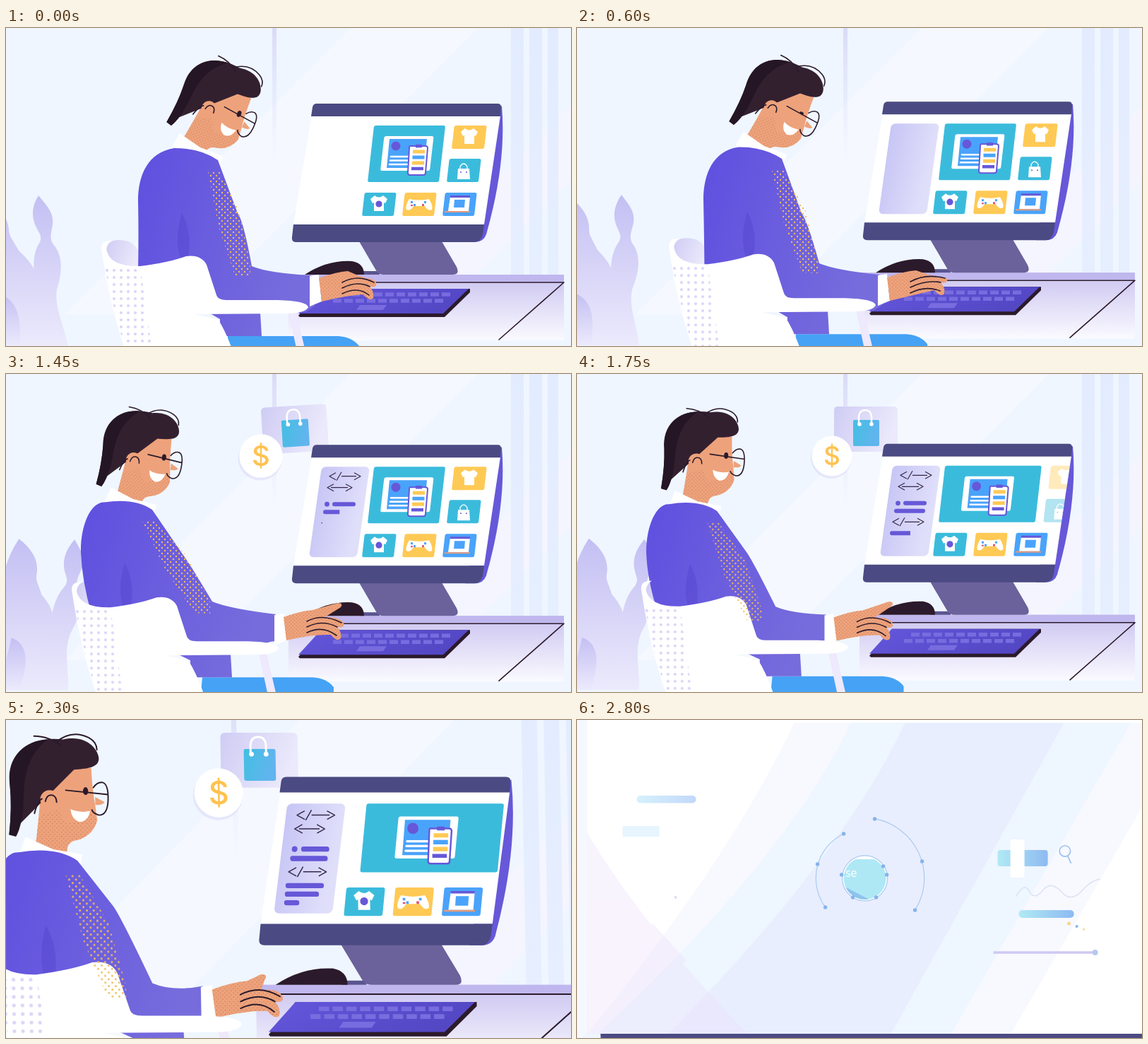
Recreate the animation shown at these times as an HTML page. Size 800 by 450 pixels, loop 2850 ms.

```html
<!DOCTYPE html>
<html lang="en">
<head>
<meta charset="utf-8">
<title>Online shop desk</title>
<style>
  html, body { margin: 0; width: 100%; height: 100%; overflow: hidden; background: #eff6ff; }
  #stage { display: block; width: 100vw; height: 100vh; }
  .line { fill: none; stroke: #2b1a2b; stroke-width: 1.6; stroke-linecap: round; stroke-linejoin: round; }
  .code { fill: none; stroke: #33294a; stroke-width: 1.2; stroke-linejoin: round; }
  .bar { stroke: #6658d8; stroke-width: 6; stroke-linecap: round; }
  .orbit { fill: none; stroke: #a9caf0; stroke-width: 1.2; }
</style>
</head>
<body>
<svg id="stage" viewBox="0 0 800 450">
<defs id="defs">
  <pattern id="skinDots" width="5" height="5" patternUnits="userSpaceOnUse"><path d="M1 1h.8v.8h-.8zM3.5 3.5h.8v.8h-.8z" fill="#a65b3d"/></pattern>
  <pattern id="chairDots" width="10" height="10" patternUnits="userSpaceOnUse"><circle cx="3" cy="3" r="2.1" fill="#dcd5f8"/></pattern>
  <pattern id="goldDots" width="8" height="8" patternUnits="userSpaceOnUse"><circle cx="2" cy="2" r="1.2" fill="#f0bd59"/><circle cx="6" cy="6" r="1.2" fill="#f0bd59"/></pattern>
  <clipPath id="screenClip"><path d="M433 124H700L677 278H407Z"/></clipPath>
  <clipPath id="discClip"><circle cx="408" cy="224" r="30"/></clipPath>
  <path id="shirt" d="M-6-11Q0-6 6-11L12-6 9 0 7-1V11H-7V-1L-9 0-12-6Z" fill="#fff"/>
</defs>
<rect width="800" height="450" fill="#eff6ff"/>
<g id="camera">
  <path d="M488 0H668L263 405H83Z" fill="#f5f9ff"/>
  <path d="M800 110V215L640 375H530Z" fill="#f4f5ff"/>
  <rect x="377" width="6" height="205" fill="url(#post)"/>
  <path d="M715 0h18v350h-18zM741 0h18v350h-18zM767 0h15v350h-15z" fill="url(#blinds)"/>

  <g id="leaves" fill="url(#leaf)">
    <path d="M-33 236C-18 246 2 262 4 285 4 295 10 300 18 315 40 335 46 350 46 368 46 400 30 420 25 450H-60V330Q-40 312-42 290-44 262-33 236Z"/>
    <path d="M-10 376Q18 385 20 425V450H-10Z"/>
    <path d="M46 237C38 250 36 262 40 275 45 290 52 292 48 303 40 315 38 330 40 350 44 385 25 420 22 450H88C82 420 68 395 72 370 80 345 80 325 70 310 60 300 64 290 66 278 68 260 56 250 46 237Z"/>
  </g>

  <g id="bagCard">
    <rect x="-45" y="-32" width="90" height="64" rx="5" fill="url(#card)"/>
    <rect x="-18" y="-13" width="37" height="37" rx="2" fill="url(#bag)"/>
    <path d="M-10-8V-18Q-9-27-1-27T8-18V-8" fill="none" stroke="#fff" stroke-width="2.5"/>
    <circle cx="-9" cy="-7" r="2.8" fill="#fff"/><circle cx="8" cy="-7" r="2.8" fill="#fff"/>
  </g>
  <g id="coin">
    <circle cx="-1" cy="3" r="29" fill="#dcdcf8" opacity=".6"/>
    <circle r="28.5" fill="#fff"/>
    <text y="13" text-anchor="middle" font-family="Inter, sans-serif" font-size="37" font-weight="500" fill="#ffc250">$</text>
  </g>

  <g id="desk">
    <path d="M400 349H790V442H400Z" fill="url(#deskFront)"/>
    <path d="M400 349H790V359H400Z" fill="#bfb7ee"/>
    <path class="line" d="M400 360H790L698 441"/>
    <path d="M500 344h29v5h-29z" fill="#5a5590"/>
    <path d="M500 302H617L638 338Q643 349 633 349H535Q527 349 524 343Z" fill="#6b619b"/>
    <path d="M423 349Q455 328 490 330 507 333 507 349Z" fill="#2b1a2b"/>
    <path d="M702 110Q709 190 680 292 676 303 664 303H650L690 120Z" fill="#6658d8"/>
    <path d="M433 124H700L677 278H407Z" fill="#fff"/>
    <path d="M432 125L434 112Q435 107 440 107H696Q702 107 701 114L700 125Z" fill="#4b4a82"/>
    <path d="M407 278H677L675 292Q672 303 663 303H411Q404 303 405 296Z" fill="#4b4a82"/>
    <g clip-path="url(#screenClip)">
      <g id="sidebar">
        <rect width="68" height="128" rx="6" transform="translate(429 266) skewX(-8) translate(0 -128)" fill="url(#side)"/>
        <g id="rows"></g>
      </g>
      <g id="sideTiles">
        <g class="tile" data-tile="631 171 46 33 #ffc955"/>
        <use href="#shirt" x="656" y="153"/>
        <g class="tile" data-tile="624 218 45 33 #3bbbdc"/>
        <path d="M640 199h16l1 15h-18z" fill="#fff"/>
        <path d="M643 201v-5q5-8 10 0v5" fill="none" stroke="#fff" stroke-width="1.3"/>
        <circle cx="644" cy="204" r="1" fill="#6658d8"/><circle cx="652" cy="204" r="1" fill="#6658d8"/>
      </g>
      <g id="lowTiles">
        <g class="tile" data-tile="504 266 45 33 #3bbbdc"/>
        <use href="#shirt" x="528" y="248"/><circle cx="528" cy="249" r="4.6" fill="#6658d8"/>
        <g class="tile" data-tile="561 266 45 33 #ffc955"/>
        <path transform="translate(585 249)" d="M-14-7Q0-4 14-7 20 3 18 8 13 11 8 3H-8Q-13 11-18 8-20 3-14-7Z" fill="#fff"/>
        <path d="M573 245h3v3h-3zM577 249h3v3h-3zM592 245h3v3h-3z" fill="#4aa3fa"/>
        <path d="M573 250h3v2h-3zM589 249h3v3h-3z" fill="#e0566f"/>
        <g class="tile" data-tile="618 266 45 33 #4aa3fa"/>
        <path d="M629 239h28l-2 20h-29z" fill="#fff"/><path d="M629 237h28v3h-28z" fill="#6658d8"/>
        <path d="M635 243h15l-1 11h-15z" fill="#4aa3fa"/><path d="M621 259h36v2h-36z" fill="#e79a78"/>
      </g>
      <g id="hero">
        <g id="heroTile" class="tile" data-tile="512 218 101 80 #3bbbdc"/>
        <g id="heroArt">
          <g class="tile" data-tile="530 202 70 49 #fff"/>
          <path d="M543 157H596L592 198H539Z" fill="#4aa3fa"/>
          <circle cx="552" cy="167" r="6.5" fill="#6658d8"/>
          <path d="M545 182h26M544 187.5h26M543 193h26" stroke="#fff" stroke-width="2.6" stroke-linecap="round"/>
          <path d="M575 167h19q3 0 3 3l-3 35q0 3-3 3h-19q-3 0-3-3l2-35q0-3 1-3z" fill="#fff" stroke="#6658d8" stroke-width="2"/>
          <path d="M576 175h17M575 191h17" stroke="#ffc955" stroke-width="5"/>
          <path d="M575.5 183h17" stroke="#4aa3fa" stroke-width="5"/>
          <path d="M574 199h17M580 167h9" stroke="#6658d8" stroke-width="4.5"/>
        </g>
      </g>
    </g>
    <path d="M414 407L446 369H657V374L621 409H416Z" fill="#2b1a2b"/>
    <path d="M414 404L446 369H655L619 404Z" fill="url(#keyboard)"/>
    <path d="M473 377H631M463 386H622" stroke="#786cdf" stroke-width="5.5" stroke-dasharray="12 4"/>
    <path d="M501 392h38l-5 7h-38z" fill="#786cdf"/>
  </g>

  <g id="person">
    <path id="chairBack" d="M142 312Q144 300 160 300 180 300 187 315L190 340 160 336Q145 328 142 312Z" fill="url(#card)"/>
    <path id="legs" d="M314 436H470Q490 437 500 450V480H310Z" fill="#45a2f5"/>
    <g id="head">
      <path d="M10-38L50-36Q51-8 54 8L56 25Q50 45 28 49 20 52 20 62L-18 64Q-14 40-10 0Z" fill="#eda27b"/>
      <path d="M52 16L56 25Q50 45 28 49 20 52 20 62L-18 64-12 20 10 12 20 30Z" fill="url(#skinDots)"/>
      <path d="M-47 42Q-43 10-45-15C-50-52-22-74 18-69 45-75 58-58 59-48 60-36 45-35 30-34 22-39Q18-42 20-10 15-3 8-10L-8 10Q-10 30-18 44-35 48-47 42Z" fill="#33202f"/>
      <path d="M-47 42Q-43 10-45-15C-48-50-26-68 0-69-32-45-28-10-30 12Q-33 34-39 44Z" fill="#251625"/>
      <circle cx="1" cy="1" r="11" fill="#eda27b"/>
      <path class="line" d="M-4 3Q-2-6 5-4 9-2 9 4M-16-73Q2-73 16-61M10-66Q28-81 48-71 57-66 57-57M-17 17Q-13 2-8 0"/>
      <path d="M54-2L65 4Q62 8 54 7Z" fill="#eda27b"/>
      <path d="M25 12Q36 17 48 14 45 27 35 27 26 24 25 12Z" fill="#fff"/>
      <ellipse id="eye" cx="43" cy="-9" rx="3" ry="4.5" fill="#2b1a2b"/>
      <path class="line" d="M20-10L69-5M52-13Q57-20 63-19 70-17 69 2 68 19 58 19 51 17 50 13"/>
    </g>
    <path id="collar" d="M-65-20L-54-38-25-18 7-6 0 12-62-8Z" fill="#fff"/>
    <path id="jacket" fill="url(#cloth)"/>
    <path id="fold" d="M249 262Q238 300 247 325L258 323Q264 290 249 262Z" fill="#4938c4" opacity=".3"/>
    <path id="cuff" d="M-2 1L11-1 15 37-2 44Z" fill="#fff"/>
    <path id="hand" fill="#eda27b"/>
    <path id="handDots" fill="url(#skinDots)"/>
    <path id="fingers" class="line"/>
    <g id="chair">
      <path d="M400 402h11l14 60h-12z" fill="#eee9fc"/>
      <path d="M135 312Q135 300 150 301 142 306 142 315 148 338 190 337 230 332 255 323 276 320 284 335L298 378Q300 385 312 385H385Q426 386 428 395 424 404 395 404L266 405 300 412Q312 430 324 465H172Q148 400 135 312Z" fill="#fff"/>
      <path d="M140 338H190L208 465H172Q152 400 140 338Z" fill="url(#chairDots)"/>
    </g>
    <path id="dots" fill="url(#goldDots)"/>
  </g>
</g>

<g id="page">
  <path d="M15-20H840V444H15Z" fill="#fff"/>
  <g id="ribbons"></g>
  <g fill="#eadcfb" opacity=".32">
    <path d="M15 160Q100 300 242 444H15Z"/><path d="M15 275Q90 360 180 444H15Z"/><path d="M15 365Q60 410 97 444H15Z"/>
    <path d="M15 380L108 288 155 340 55 444H15ZM35 444L72 416 105 444Z"/>
  </g>
  <rect x="85" y="107" width="84" height="10.5" rx="5" fill="url(#pill)"/>
  <rect x="65" y="150" width="52" height="15" fill="#e6f5fe"/>
  <circle cx="140" cy="251" r="2" fill="#e3d9f5"/>
  <g class="orbit">
    <path d="M378 161A70 70 0 0 0 352 265M422 140A85 85 0 0 1 479 269"/>
    <circle cx="408" cy="224" r="32" fill="#fff"/>
  </g>
  <g clip-path="url(#discClip)">
    <path d="M370 197H450V260H370Z" fill="#afe8f5"/>
    <path d="M376 234L416 255H376Z" fill="#8fc3ee"/>
    <text x="397" y="222" text-anchor="end" font-family="'Open Sans', sans-serif" font-size="16" fill="#fff">rse</text>
  </g>
  <g id="nodes" fill="#86b4ea"></g>
  <rect x="596" y="184" width="71" height="23" rx="4" fill="url(#button)"/>
  <rect x="614" y="169" width="20" height="54" rx="2" fill="#fff"/>
  <path d="M695 192L700 203M699 185.5a7.7 7.7 0 1 0-15.4 0a7.7 7.7 0 1 0 15.4 0" fill="none" stroke="#9cc0f0" stroke-width="1.7"/>
  <path d="M622 250Q634 228 641 243 648 256 661 240 673 226 690 247 702 257 717 240 728 227 741 225" fill="none" stroke="#dde3f3" stroke-width="1.6"/>
  <rect x="626" y="269" width="78" height="11" rx="5" fill="url(#button)"/>
  <circle cx="697" cy="288" r="2.5" fill="#f8d58a"/><circle cx="708" cy="292" r="2" fill="#86b4ea"/><circle cx="718" cy="296" r="1.5" fill="#f8d58a"/>
  <path d="M590 329H735" stroke="#cfc8f2" stroke-width="3.5"/><circle cx="734" cy="329" r="4" fill="#b7c8ef"/>
</g>
</svg>
<script>
const $ = id => document.getElementById(id);
const set = (id, name, value) => $(id).setAttribute(name, value);
const move = (id, x, y, extra = '') => set(id, 'transform', `translate(${x} ${y}) ${extra}`);

// id, x2, y2, first colour, last colour, last opacity
[
  ['post', 0, 1, '#dadaf6', '#e8ebfd', 0], ['blinds', 0, 1, '#e2ecfe', '#e4edff', .8],
  ['leaf', 0, 1, '#c3bff3', '#eceafc', 1], ['card', 1, .3, '#cfccf4', '#ebe9fb', 1],
  ['bag', 1, .3, '#43bfe2', '#62b4ee', 1], ['deskFront', 0, 1, '#cbc4f0', '#fafaff', 1],
  ['side', 1, .2, '#c7c5f5', '#e0dffa', 1], ['keyboard', 1, .3, '#6557dc', '#5347c4', 1],
  ['cloth', 1, .3, '#5f4fe0', '#776cdc', 1], ['pill', 1, 0, '#d5f1fc', '#c2d8fa', 1],
  ['button', 1, 0, '#b0eaf4', '#8dbaf1', 1]
].forEach(([id, x, y, from, to, alpha]) => $('defs').innerHTML +=
  `<linearGradient id="${id}" x2="${x}" y2="${y}"><stop stop-color="${from}"/><stop offset="1" stop-color="${to}" stop-opacity="${alpha}"/></linearGradient>`);

document.querySelectorAll('.tile').forEach(tile => {
  const [x, y, w, h, fill] = tile.dataset.tile.split(' ');
  tile.innerHTML = `<rect y="${-h}" width="${w}" height="${h}" rx="2.5" fill="${fill}" transform="translate(${x} ${y}) skewX(-6.5)"/>`;
});

const tag = (w, slash) => `<path class="code" d="M10 2L1 7 10 12${slash ? 'M18 1L11 13' : ''}M${slash ? 18 : 6} 7H${w - 7}M${w - 10} 2L${w - 1} 7 ${w - 10} 12"/>`;
const bar = w => `<path class="bar" d="M3 7H${w - 3}"/>`;
// x, y, width, start, end, content
const rows = [
  [457, 151.5, 46, 850, 1150, tag(46, true)], [454, 167.5, 37, 930, 1200, tag(37)],
  [451, 191, 7, 1220, 1270, '<circle cx="3.5" cy="7" r="3.4" fill="#6658d8"/>'],
  [462, 191, 33, 1260, 1400, bar(33)], [449, 202, 44, 1360, 1530, bar(44)],
  [446, 217.5, 46, 1440, 1720, tag(46, true)], [443, 233.5, 45, 1660, 1800, bar(45)],
  [442, 243.5, 40, 1760, 1900, bar(40)], [441, 253.5, 18, 1860, 1960, bar(18)]
];
$('rows').innerHTML = rows.map(([x, y, , , , art]) => `<svg x="${x}" y="${y - 7}" height="14">${art}</svg>`).join('');

$('ribbons').innerHTML = [
  [308, -60, 870, 615, '#f8f9ff'], [388, 30, 785, 530, '#eef6ff'], [465, 130, 690, 445, '#e9eefe']
].map(([a, b, c, d, fill]) => `<path d="M${a} 4Q${a - 90} 195 ${Math.max(b, 15)} 444H${d}L${c} 4Z" fill="${fill}"/>`).join('');
$('nodes').innerHTML = [[378, 161], [341, 204], [352, 265], [422, 140], [489, 200], [479, 269], [434, 207], [439, 219], [375, 219], [391, 251], [424, 251]]
  .map(([x, y]) => `<circle cx="${x}" cy="${y}" r="2.7"/>`).join('');

// Smooth monotone interpolation through [time, value] keys
function track(...keys) {
  const slope = keys.slice(1).map(([t, v], i) => (v - keys[i][1]) / (t - keys[i][0]));
  const tangent = keys.map((_, i) => {
    const a = slope[i - 1], b = slope[i];
    return a * b > 0 ? 2 * a * b / (a + b) : 0;
  });
  return t => {
    if (t <= keys[0][0]) return keys[0][1];
    const j = keys.findIndex(k => k[0] >= t), i = j - 1;
    if (j < 0) return keys.at(-1)[1];
    const [t0, v0] = keys[i], [t1, v1] = keys[j], d = t1 - t0, u = (t - t0) / d;
    return v0 + (v1 - v0) * u * u * (3 - 2 * u) + d * u * (1 - u) * (tangent[i] * (1 - u) - tangent[j] * u);
  };
}
const POSE_TIMES = [0, 600, 1000, 1450, 2050, 2450];
const pose = (...values) => track(...values.map((v, i) => [POSE_TIMES[i], v]));
const clamp = v => Math.min(1, Math.max(0, v));

const tracks = {
  earX: pose(287, 275, 262, 180, 163), earY: pose(113, 112, 111, 121, 123),
  tilt: pose(23, 23, 22, 8, 0),
  back: pose(187, 179, 168, 106, 95),
  neckX: pose(300, 290, 279, 207, 195), neckY: pose(187, 185, 183, 192, 195),
  chestX: pose(328, 318, 325, 250, 235), chestY: pose(262, 262, 255, 255, 247),
  elbowX: pose(348, 343, 370, 292, 277, 281), elbowY: pose(337, 333, 318, 322, 336, 338),
  wristX: pose(432, 428, 454, 382, 338), wristY: pose(350, 349, 347, 340, 341),
  tipX: pose(76, 80, 91, 93, 95, 64), tipY: pose(4, 4, -9, -14, -18, -9),
  knuckleX: pose(86, 90, 88, 90, 87), knuckleY: pose(30, 25, 30, 32, 32),
  dotsX: pose(346, 341, 363, 289, 249), dotsY: pose(335, 331, 314, 323, 340),
  chair: pose(0, -5, -10, -42, -45), legs: pose(0, -4, -8, -36, -38),
  sway: pose(0, .08, .14, .24, .225),
  coinY: track([950, 138], [1000, 131], [1200, 113], [1450, 116]),
  coinSize: track([950, .55], [1000, .7], [1250, 1.14], [1450, 1.08], [1700, 1]),
  coinAlpha: track([950, 0], [1000, .3], [1120, 1]),
  bagSize: track([1120, 0], [1330, 1.08], [1450, 1.03], [1700, 1]),
  bagTurn: track([1120, -22], [1450, -3.5], [1700, 0]),
  side: track([100, -115], [450, -22], [600, -2], [700, 0], [2200, 0], [2450, -31], [2650, -115]),
  heroGrow: track([1550, 0], [1900, 1]),
  heroOut: track([2200, 0], [2450, 57], [2650, 190]),
  lowOut: track([2200, 0], [2450, 14.5], [2620, 60]),
  zoom: track([2100, 1], [2450, 1.53], [2800, 2.84]),
  focusX: track([2100, 644], [2450, 644], [2800, 660]), focusY: track([2100, 177], [2800, 173.4]),
  shear: track([2100, 0], [2450, .045], [2800, .155]),
  page: track([2550, 0], [2780, 1])
};

function drawPerson(p, pan) {
  move('head', p.earX, p.earY, `rotate(${p.tilt})`);
  move('collar', p.neckX, p.neckY, `rotate(${(p.tilt - 23) * .45})`);
  const lean = 187 - p.back, drop = p.neckY - 187;
  const hip = x => x + p.chair;
  const { neckX: nx, neckY: ny, chestX: cx, chestY: cy, elbowX: ex, elbowY: ey, wristX: wx, wristY: wy, dotsX: dx, dotsY: dy } = p;
  set('jacket', 'd', `M${nx - 62 - lean * .07} ${ny - 17 + lean * .08}
    C${p.back + 14} ${176 + drop} ${p.back} ${208 + drop} ${p.back} ${245 + drop}
    Q${p.back + 1} 290 ${p.back + lean * .18} ${345 + pan}
    L${hip(303)} ${412 + pan}V${436 + pan}H${hip(362)}L${hip(360)} ${403 + pan}
    L${wx - 8} ${wy + 52 - lean * .16}L${wx + 5} ${wy + 43 - lean * .07}L${wx} ${wy}
    Q${ex + 24} ${ey + 10} ${ex} ${ey}Q${cx + 8} ${cy + 10} ${cx} ${cy}
    L${nx} ${ny}Q${nx - 25} ${ny - 17} ${nx - 62 - lean * .07} ${ny - 17 + lean * .08}Z`);
  move('fold', -lean, drop);
  move('cuff', wx, wy);

  const at = (x, y) => `${wx + x} ${wy + y}`;
  const { tipX: tx, tipY: ty, knuckleX: kx, knuckleY: ky } = p;
  const hand = `M${at(11, 4)}Q${at(36, -5)} ${at(52, -6)}L${at(tx - 5, ty - 2)}q8 0 4 6L${at(68, 5)}
    Q${at(88, 2)} ${at(kx + 6, ky - 20)}Q${at(kx + 8, ky - 12)} ${at(kx - 3, ky - 14)}
    Q${at(kx + 4, ky - 6)} ${at(kx + 2, ky + 2)}Q${at(kx - 3, ky + 8)} ${at(kx - 12, ky - 3)}
    Q${at(52, 28)} ${at(15, 37)}Z`;
  set('hand', 'd', hand);
  set('handDots', 'd', hand);
  set('fingers', 'd', `M${at(44, 10)}Q${at(66, -2)} ${at(kx + 3, ky - 20)}M${at(44, 18)}Q${at(66, 7)} ${at(kx - 3, ky - 14)}
    M${at(44, 26)}Q${at(66, 15)} ${at(kx - 4, ky - 2)}`);
  set('dots', 'd', `M${nx - 14} ${ny + 16}L${nx + 2} ${ny + 16}L${(nx + dx) / 2 + 8} ${(ny + dy) / 2}L${dx} ${dy}
    V${dy + 16}L${dx - 22} ${dy + 15}L${(nx + dx) / 2 - 22} ${(ny + dy) / 2 + 20}Z`);
  set('goldDots', 'patternTransform', `translate(${nx} ${ny})`);
  for (const id of ['chair', 'chairBack']) move(id, p.chair, pan);
  move('legs', p.legs, pan);
}

// The camera zooms on the screen while its slanted sides straighten; the page lands exactly at full zoom
function drawCamera({ zoom, focusX, focusY, shear, page }) {
  const x = -focusX * (zoom - 1), y = -focusY * (zoom - 1), size = zoom / 2.84;
  move('camera', x, y, `scale(${zoom}) matrix(1 0 ${shear} 1 ${-60 * shear} 0)`);
  move('page', x + 1214 * size, y + 319 * size, `scale(${size})`);
  set('page', 'opacity', page);
}

function draw(t) {
  const p = Object.fromEntries(Object.entries(tracks).map(([name, f]) => [name, f(t)]));
  const pan = -Math.min(9.5, t * .00468);
  drawCamera(p);
  move('desk', 0, pan);
  set('leaves', 'transform', `matrix(1 0 ${-p.sway} 1 ${450 * p.sway} ${pan * .4})`);

  move('coin', 361, p.coinY, `scale(${p.coinSize})`);
  set('coin', 'opacity', p.coinAlpha);
  move('bagCard', 409, 78, `rotate(${p.bagTurn}) scale(${p.bagSize})`);

  move('sidebar', p.side, 0);
  rows.forEach(([, , width, start, end], i) =>
    $('rows').children[i].setAttribute('width', width * clamp((t - start) / (end - start))));
  move('sideTiles', 60 * p.heroGrow, 0);
  set('sideTiles', 'opacity', 1 - p.heroGrow);
  $('heroTile').firstChild.setAttribute('width', 101 + 59 * p.heroGrow);
  move('heroArt', 22.5 * p.heroGrow, 0);
  move('hero', p.heroOut, 0);
  move('lowTiles', 0, p.lowOut);

  set('eye', 'ry', Math.abs(t - 600) < 75 ? 1.8 : 4.5);
  drawPerson(p, pan);
}

const LOOP = 2850, STEP = 50, begin = performance.now();
function tick() {
  const t = (performance.now() - begin) % LOOP;
  draw(Math.floor(t / STEP) * STEP);
  requestAnimationFrame(tick);
}
tick();
</script>
</body>
</html>
```
